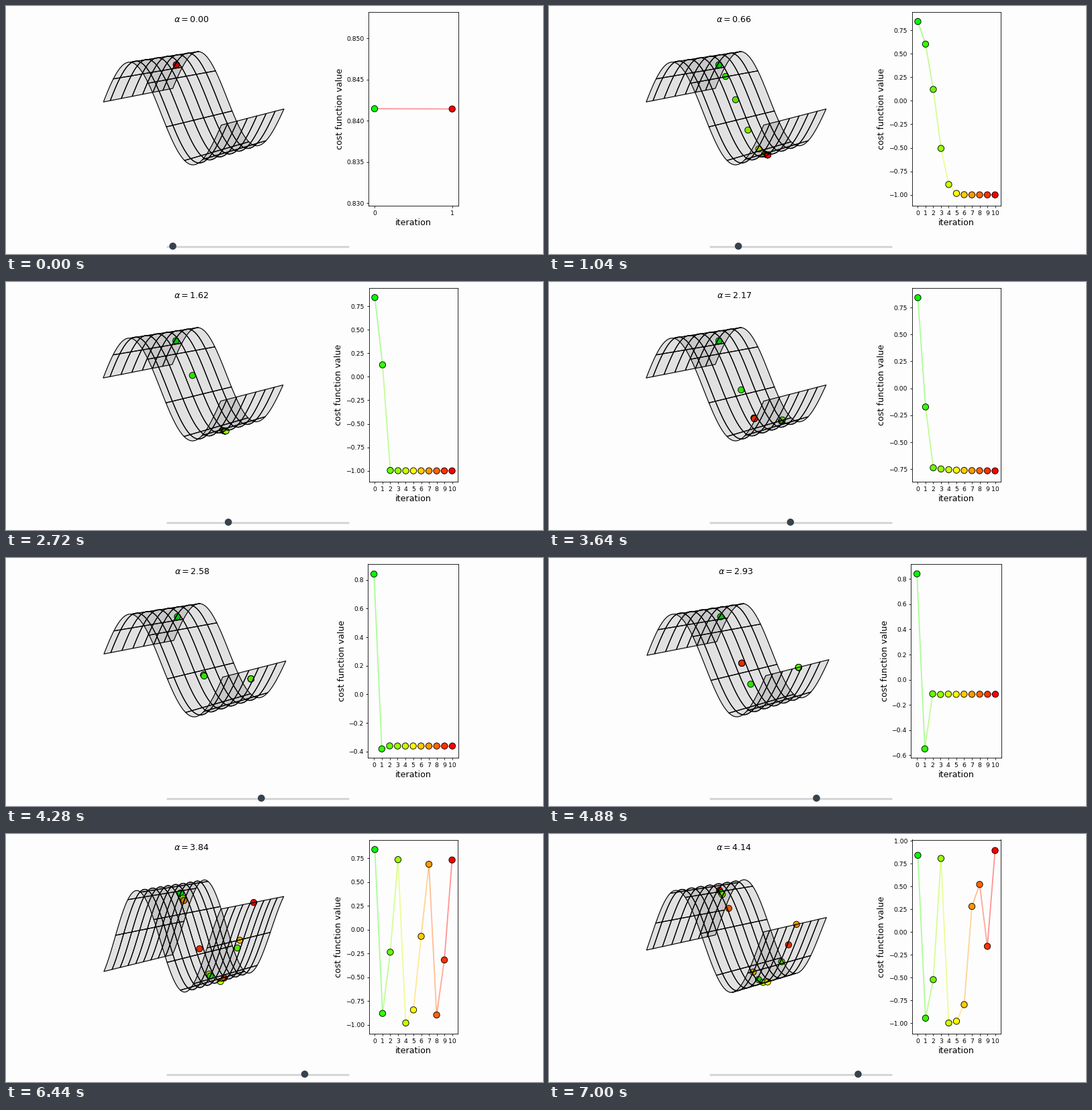
Animation, 800 px wide and 370 px high, one loop 7.04 s. Source, as a matplotlib script:

```python
import numpy as np
import matplotlib.pyplot as plt
from matplotlib.animation import FuncAnimation
from matplotlib.collections import LineCollection, PolyCollection
from matplotlib.patches import Circle

W, H, DPI = 800, 370, 100
FRAMES, INTERVAL = 176, 40
PX = 72 / DPI                       # points per pixel
BG = "#fefdfe"
ALPHAS = np.linspace(1e-4, 5, 100)
ELEV = np.radians(10)
AZIM = np.radians(-60)

plt.rcParams["font.family"] = "DejaVu Sans"


def descend(rate, start=1.0, steps=10, tol=1e-4):
    """Gradient descent on sin(x)."""
    xs = [start]
    for _ in range(steps):
        xs.append(xs[-1] - rate * np.cos(xs[-1]))
        if abs(xs[-1] - xs[-2]) < tol:
            break
    return np.array(xs)


def ramp(n):
    """Green to yellow to red."""
    t = np.linspace(0, 1, n)
    return np.column_stack([np.clip(2 * t, 0, 1), np.clip(2 - 2 * t, 0, 1), 0 * t])


def cost_limits(cost, frac=0.0107):
    """Axis limits that leave room for the markers as they are added."""
    lo, hi, span = np.inf, -np.inf, 1.0
    for c in cost:
        lo, hi = min(lo, c - frac * span), max(hi, c + frac * span)
        span = 1.1 * (hi - lo)
    margin = 0.05 * (hi - lo)
    return lo - margin, hi + margin


def project(x, y, half, cx, scale):
    """Perspective view of the point (x, y, sin x); returns pixels and depth."""
    a, b, c = -x / (2 * half), -y / (2 * half), 0.486 * np.sin(x)
    toward = np.cos(AZIM) * a + np.sin(AZIM) * b
    right = -np.sin(AZIM) * a + np.cos(AZIM) * b
    up = np.cos(ELEV) * c - np.sin(ELEV) * toward
    depth = -np.cos(ELEV) * toward - np.sin(ELEV) * c
    w = 1 + depth / 10
    return np.stack([cx + scale * right / w, 148.5 - 146.3 * up / w], -1), depth


def surface(half, cx, scale):
    """Grid patches of the wave, far ones first."""
    strips = 6.6 + 1.24 * (2 * half - 6)
    nodes = -half + 2 * half / strips * np.arange(int(np.ceil(strips - 0.03)))
    nodes = np.append(nodes, half)
    patches = []
    for x0, x1 in zip(nodes[:-1], nodes[1:]):
        line = np.linspace(x0, x1, 9)
        xs = np.concatenate([line, line[::-1]])
        for y0, y1 in zip(nodes[:-1], nodes[1:]):
            pts, depth = project(xs, np.repeat([y0, y1], 9), half, cx, scale)
            patches.append((depth.mean(), pts))
    patches.sort(key=lambda p: -p[0])
    return [pts for _, pts in patches]


def narrowness(ax):
    """How much shorter the widest y label is than one like -0.25."""
    lo, hi = ax.get_ylim()
    locs = [v for v in ax.get_yticks() if lo <= v <= hi]
    labels = ax.yaxis.get_major_formatter().format_ticks(locs)
    em = {".": 0.318, "\u2212": 0.838}
    widest = max(sum(em.get(ch, 0.636) for ch in s) for s in labels)
    return (3.064 - widest) / 0.636


fig = plt.figure(figsize=(W / DPI, H / DPI), dpi=DPI, facecolor=BG)

stage = fig.add_axes([0, 0, 1, 1])
stage.set(xlim=(0, W), ylim=(H, 0))
stage.axis("off")

DOTS = dict(s=45, edgecolors="black", linewidths=0.65)
balls = stage.scatter([], [], zorder=2, **DOTS)
sheet = PolyCollection([], facecolors=(0, 0, 0, 0.11), edgecolors="black",
                       linewidths=0.85, zorder=3)
stage.add_collection(sheet, autolim=False)
title = stage.text(276, 20.5, "", fontsize=12.65 * PX, ha="center", va="center")
stage.plot([239, 511], [358.5, 358.5], color="#d6d5d7", lw=3 * PX,
           solid_capstyle="butt", zorder=1)
knob = Circle((248.5, 358.3), 5.3, fc="#36424d", ec="none", zorder=4)
stage.add_patch(knob)

chart = fig.add_axes([0.675, 0.2, 0.16, 0.78], facecolor=BG)
chart.set_xlabel("iteration", fontsize=12.65 * PX, labelpad=2.7)
chart.set_ylabel("cost function value", fontsize=12.65 * PX, labelpad=2.7)
chart.tick_params(labelsize=9.3 * PX, length=2.35, width=0.6, pad=2.35)
chart.ticklabel_format(axis="y", useOffset=False)
for spine in chart.spines.values():
    spine.set_linewidth(0.6)
trail = LineCollection([], linewidths=1.9 * PX, alpha=0.4, zorder=1)
chart.add_collection(trail, autolim=False)
marks = chart.scatter([], [], zorder=3, **DOTS)


def slider_index(frame):
    """Hand-dragged slider, snapped to whole steps."""
    k = np.interp(frame, [0, 26, 68, 91, 122, 161, 175],
                  [0, 13, 32, 43, 58, 76, 82])
    return int(round(k))


def update(frame):
    rate = ALPHAS[slider_index(frame)]
    xs = descend(rate)
    cost = np.sin(xs)
    n = len(xs) - 1
    colors = ramp(n + 1)

    chart.set_xlim(-0.077 * n, 1.077 * n)
    chart.set_xticks(range(n + 1))
    chart.set_ylim(*cost_limits(cost))
    s = narrowness(chart)
    left, right = 540.6 - 1.4 * s, 673.4 + 0.6 * s
    chart.set_position([left / W, 1 - 298 / H, (right - left) / W, 289.5 / H])
    pts = np.column_stack([np.arange(n + 1), cost])
    marks.set_offsets(pts)
    marks.set_facecolors(colors)
    trail.set_segments(list(np.stack([pts[:-1], pts[1:]], 1)))
    trail.set_color(colors[1:])

    half = max(3.0, np.abs(xs).max())
    cx, scale = 281.4 + 2.6 * s, 196.1 + 2.2 * s
    sheet.set_verts(surface(half, cx, scale))
    spots, depth = project(xs, 0 * xs, half, cx, scale)
    order = np.argsort(-depth, kind="stable")
    balls.set_offsets(spots[order])
    balls.set_facecolors(colors[order])

    title.set_text(rf"$\alpha = {rate:.2f}$")
    title.set_x(276 + 2 * s)
    knob.center = (248.5 + 51.2 * rate, 358.3)
    return balls, sheet, title, knob, trail, marks


anim = FuncAnimation(fig, update, frames=FRAMES, interval=INTERVAL,
                     init_func=lambda: update(0), repeat=True, repeat_delay=0)
plt.show()
```
